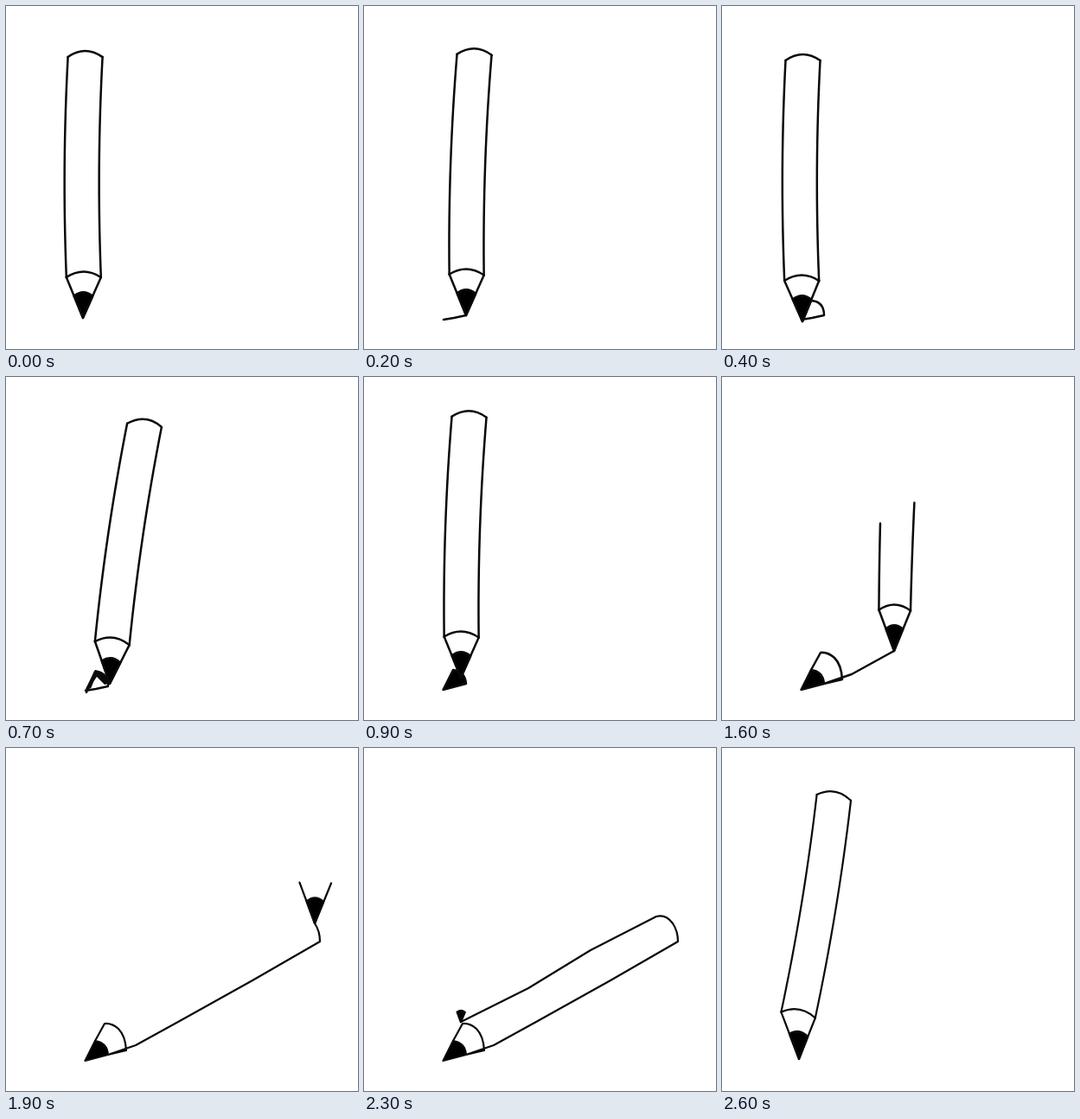
Recreate the animation shown at these times as an HTML page with a canvas. Size 407 by 397 pixels, loop 2.7 s.

```html
<!DOCTYPE html>
<html lang="en">
<head>
<meta charset="utf-8">
<title>Pencil</title>
<style>
  html, body { margin: 0; width: 100%; height: 100%; overflow: hidden; background: #fff; }
  canvas { display: block; }
</style>
</head>
<body>
<canvas id="stage" width="407" height="397"></canvas>
<script>
const ctx = document.getElementById('stage').getContext('2d');
const STEP = 100, STEPS = 27, FULL = 255, LEAD = 0.54;

// Pen position at each step; an optional second pair is the curve control.
const trail = [
  [89, 361], [104, 361], [118, 358], [103, 341, 118, 342], [93, 365],
  [97, 350], [104, 339], [120, 355], [96, 358], [112, 348],
  [103, 339], [114, 319], [130, 325, 122, 318], [139, 350, 138, 333],
  [118, 355], [150, 344], [199, 317], [285, 269], [363, 224],
  [357, 203, 363, 212], [338, 195, 349, 192], [262, 234], [190, 278], [112, 317]
];
const leans = [0.4, 1, 2, 3, 0.3, 4, 9.5, 8.4, -4, 2, 1, 1.5, 1.5, 2, 2, 2, 2.2];

// Wall lengths left over from step 11 on, then cone left over from step 20 on.
const walls = [[225, 255], [187, 251], [165, 220], [145, 190], [122, 155], [100, 125], [45, 62], [0, 10]];
const cones = [1, 0.75, 0.45, 0.24];

const rad = deg => deg * Math.PI / 180;
const up = (p, deg, d) => [p[0] + Math.sin(rad(deg)) * d, p[1] - Math.cos(rad(deg)) * d];
const mix = (a, b, k) => [a[0] + (b[0] - a[0]) * k, a[1] + (b[1] - a[1]) * k];

function line(...pts) {
  ctx.beginPath();
  pts.forEach(p => ctx.lineTo(...p));
  ctx.stroke();
}

function arch(a, b, deg, rise) {
  ctx.quadraticCurveTo(...up(mix(a, b, 0.5), deg, rise * 2), ...b);
}

function wall(base, deg, length, bend) {
  ctx.beginPath();
  for (let i = 0; i <= 16; i++) {
    const d = length * i / 16, u = d / FULL;
    ctx.lineTo(...up(up(base, deg, d), deg + 90, bend * 4 * u * (1 - u)));
  }
  ctx.stroke();
}

function pencil({ tip, lean, aim = lean * 0.4, slope = lean * 0.7, half = 20, height = 47,
                  left = FULL, right = FULL, bend = -3, flare = 0,
                  cap = true, collar = true, cone = 1 }) {
  const mid = up(tip, aim, height);
  const l = up(mid, slope - 90, half), r = up(mid, slope + 90, half);
  if (left) wall(l, lean - flare, left, bend);
  if (right) wall(r, lean + flare, right, bend);
  if (cap) {
    const a = up(l, lean, left), b = up(r, lean, right);
    ctx.beginPath();
    ctx.moveTo(...a);
    arch(a, b, lean, 7);
    ctx.stroke();
  }
  if (collar) {
    ctx.beginPath();
    ctx.moveTo(...l);
    arch(l, r, slope, 6.5);
    ctx.stroke();
  }
  line(mix(tip, l, cone), tip, mix(tip, r, cone));
  const k = Math.min(LEAD, cone), a = mix(tip, l, k), b = mix(tip, r, k);
  ctx.beginPath();
  ctx.moveTo(...tip);
  ctx.lineTo(...a);
  arch(a, b, slope, 8 * k);
  ctx.closePath();
  ctx.fill();
  ctx.stroke();
}

function ink(start, from, to) {
  ctx.beginPath();
  ctx.moveTo(...start);
  for (let i = from; i <= to; i++) {
    const [x, y, cx = x, cy = y] = trail[i];
    ctx.quadraticCurveTo(cx, cy, x, y);
  }
  ctx.stroke();
}

function sector() {
  ctx.beginPath();
  ctx.moveTo(91.5, 362);
  ctx.lineTo(103, 339);
  ctx.quadraticCurveTo(117, 341, 118, 355);
  ctx.closePath();
}

function drawing(n) {
  if (n < 1) return;
  if (n < 9) {
    ink([92, 363], 1, Math.min(n, 4));
    if (n < 5) return;
    ctx.save();
    sector();
    ctx.clip();
    ctx.lineWidth = 10;
    ink([92, 362], 5, n);
    ctx.restore();
    return;
  }
  sector();
  ctx.fill();
  ctx.stroke();
  if (n > 10) ink(trail[10], 11, n);
}

function penPose(n) {
  const pose = { tip: trail[n].slice(0, 2), lean: leans[Math.min(n, 16)] };
  if (n === 0) pose.aim = 1;
  if (n === 4) pose.aim = -1;
  if (n > 10) {
    const [left, right] = walls[n - 11] || [0, 0];
    Object.assign(pose, { left, right, half: 18.3, bend: -1.5, flare: 0.5, cap: false,
                          collar: n < 19, cone: n < 20 ? 1 : cones[n - 20] });
  }
  return pose;
}

const rising = [
  { tip: [90, 362], lean: 45, aim: 40, slope: 39, left: 262, right: 262, bend: 2 },
  { tip: [90, 361], lean: 25, aim: 18, slope: 22, bend: 3 },
  { tip: [89, 360], lean: 9.3, aim: -1, slope: 10, height: 51, bend: 3 }
];

function draw(n) {
  ctx.fillStyle = '#fff';
  ctx.fillRect(0, 0, 407, 397);
  ctx.fillStyle = '#000';
  ctx.strokeStyle = '#0a0a0a';
  ctx.lineWidth = n < 17 ? 2.5 : 2.2;
  ctx.lineCap = ctx.lineJoin = 'round';
  if (n < trail.length) {
    drawing(n);
    pencil(penPose(n));
  } else {
    pencil(rising[n - trail.length]);
  }
}

const begin = performance.now();
function tick() {
  const t = Math.max(0, performance.now() - begin);
  draw(Math.floor(t / STEP) % STEPS);
  requestAnimationFrame(tick);
}
tick();
</script>
</body>
</html>
```
